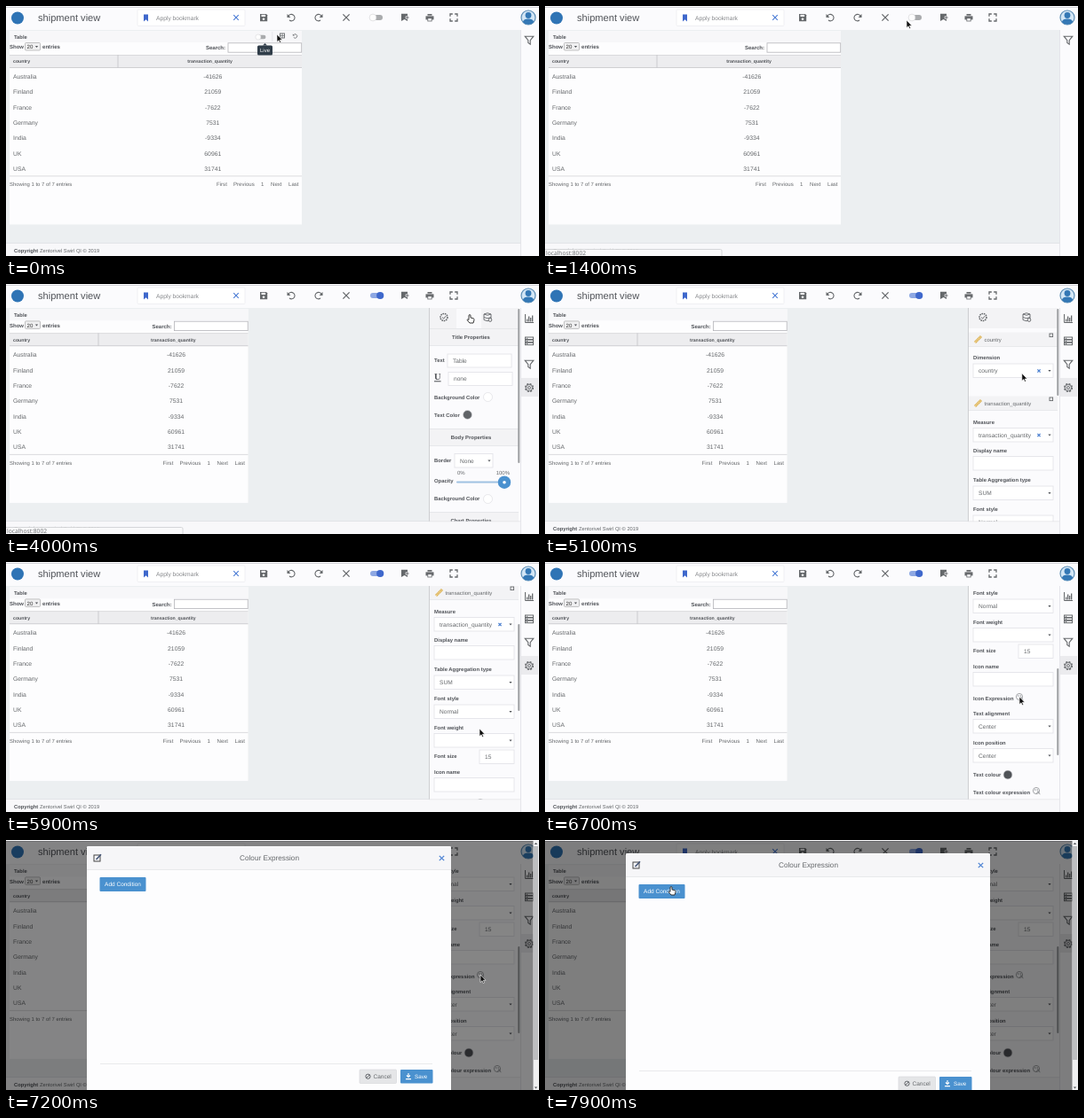
These frames come from a looping animation (600x282 px, 8 s). An HTML page:

```html
<!DOCTYPE html>
<html lang="en">
<head>
<meta charset="utf-8">
<title>Shipment view</title>
<style>
html, body { margin: 0; width: 100%; height: 100%; overflow: hidden; background: #eceff1; }
svg { display: block; width: 600px; height: 282px; font-family: "Liberation Sans", Arial, sans-serif; text-rendering: geometricPrecision; }
</style>
</head>
<body>
<svg id="stage" viewBox="0 0 600 282"></svg>
<script>
const LOOP = 8000, STEP = 100;
const GREY = '#65686b', INK = '#505358', BLUE = '#3f68cc', BUTTON = '#4a91cf', LINE = '#e1e2e6', PALE = '#fbfbfd', BAND = '#f3f3f5';

// Drawing helpers; text is placed by its vertical middle.
const rect = (x, y, w, h, fill, more = '') => `<rect x="${x}" y="${y}" width="${w}" height="${h}" fill="${fill}" ${more}/>`;
const circle = (x, y, r, fill, more = '') => `<circle cx="${x}" cy="${y}" r="${r}" fill="${fill}" ${more}/>`;
const stroke = (d, color = GREY, w = 1, more = '') => `<path d="${d}" fill="none" stroke="${color}" stroke-width="${w}" ${more}/>`;
const fill = (d, color = GREY, more = '') => `<path d="${d}" fill="${color}" ${more}/>`;
const text = (x, y, s, size = 6.1, color = GREY, more = '') =>
  `<text x="${x}" y="${y + size * .36}" font-size="${size}" fill="${color}" ${more}>${s}</text>`;
const bold = (x, y, s, size = 5.9, more = '') => text(x, y, s, size, INK, 'font-weight="bold" ' + more);
const MID = 'text-anchor="middle"', END = 'text-anchor="end"';
const at = (x, y, body, more = '', k = 1) => `<g transform="translate(${x} ${y}) scale(${k})" ${more}>${body}</g>`;
const caret = (x, y) => fill(`M${x - 1.6} ${y - .8}h3.2l-1.6 2z`, INK);
const cross = (x, y, r, color, w = 1.2) => stroke(`M${x - r} ${y - r}l${2 * r} ${2 * r}m0 ${-2 * r}l${-2 * r} ${2 * r}`, color, w);
const input = (x, y, w, h, value = '') => rect(x, y, w, h, '#fff', `stroke="${LINE}" stroke-width=".8"`) + text(x + 6, y + h / 2, value, 6.6);
const select = (x, y, w, h, value) => input(x, y, w, h, value) + caret(x + w - 4, y + h / 2);

const shapes = {
  save: fill('M-4-4H3L4.2-2.8V4.2H-4Z') + rect(-2.5, -3.2, 4.6, 2.2, PALE) + circle(0, 1.7, 1.3, PALE),
  undo: stroke('M-3-1.5A3.7 3.7 0 1 1-2 3', GREY, 1.1) + fill('M-4.5-4V0H-.6Z'),
  print: rect(-4.5, -1.6, 9, 4, GREY) + rect(-2.5, -4, 5, 1.7, GREY) + rect(-2.2, .8, 4.4, 3.2, PALE, `stroke="${GREY}" stroke-width=".8"`),
  expand: stroke('M-4-1.2V-4H-1.2M1.2-4H4V-1.2M4 1.2V4H1.2M-1.2 4H-4V1.2', GREY, 1.3),
  marker: fill('M-3.5-4.2H3.5V4L0 2-3.5 4Z') + stroke('M1.2 0h4M3.2-2v4', PALE, 2.3) + stroke('M1.5 0h3.6M3.3-1.8v3.6', GREY, .9),
  chart: stroke('M-4.5-5V4.5H5', GREY, 1) + [3, 6, 4.5, 7].map((h, i) => rect(-3 + i * 2, 3.5 - h, 1.3, h, GREY)).join(''),
  server: [-4.5, -1.4, 1.7].map(y => rect(-4.5, y, 9, 2.5, 'none', `stroke="${GREY}"`) + rect(-3.2, y + .8, 1.4, 1, GREY)).join(''),
  filter: stroke('M-4.8-4.3H4.8L1.2 .2V4.6L-1.2 3V.2Z', GREY, 1.1),
  grid: rect(-2.5, -2.5, 5, 5, 'none', `stroke="${GREY}" stroke-width=".9"`) + stroke('M-2.5 0h5M0-2.5v5', GREY, .7),
  reload: stroke('M-2-1A2.2 2.2 0 1 1-1.7 1.4', GREY, .8) + fill('M-2.7-2.6V-.4H-.6Z'),
  frame: rect(-2.2, -2.2, 4.4, 4.4, 'none', `stroke="${GREY}" stroke-width=".8" stroke-dasharray="2 1"`),
  badge: circle(0, 0, 4, 'none', `stroke="${GREY}" stroke-width="1.5" stroke-dasharray="1.6 .8"`) + stroke('M-2 0L-.3 1.6 2.2-1.4', GREY, 1),
  data: [-3.5, 0, 3].map(y => stroke(`M-4 ${y}q4 2.5 8 0`, GREY, .9)).join('') + stroke('M-4-3.5V3M4-3.5V3M-4-3.5q4-2.5 8 0', GREY, .9) + circle(3, 3, 1.8, PALE, `stroke="${GREY}" stroke-width="1"`),
  palette: circle(0, 0, 3.6, 'none', 'stroke="#8d9093" stroke-width=".8"') + circle(-1.2, -1, .7, '#8d9093') + circle(1.2, -1, .7, '#8d9093') + stroke('M.3 3.5L2 .5 4.2 4.2', '#8d9093', .8),
  arrow: fill('M0 0V8.6L2 6.8 3.3 9.6 4.6 9 3.3 6.3H6Z', '#111', 'stroke="#fff" stroke-width=".6"'),
  hand: fill('M-1 .2Q0-1 1 .2V3L4.2 3.8Q5.2 4.2 5 5.5L4 9H0L-3 5.6Q-2.5 4.4-1 5.3Z', '#fff', 'stroke="#222" stroke-width=".9"')
};
const icon = (name, x, y) => at(x, y, shapes[name]);
const gear = (x, y, color) => circle(x, y, 4.3, 'none', `stroke="${color}" stroke-width="1.5" stroke-dasharray="2.1 1.28"`) +
  circle(x, y, 3.5, 'none', `stroke="${color}" stroke-width=".8"`) + circle(x, y, 1.5, 'none', `stroke="${color}" stroke-width=".9"`);

function toggle(x, y, on, k = 1) {
  const knob = on ? circle(4.2, 0, 4.1, BLUE) : circle(-4, 0, 3.9, '#fdfdfd', 'stroke="#d2d2d4" stroke-width=".6"');
  return at(x, y, rect(-7, -3, 14, 6, on ? '#8ea8e3' : '#a9abad', 'rx="3"') + knob, '', k);
}

// Linear path through [time, ...values] keys.
function along(keys, t) {
  const i = keys.findIndex(k => k[0] > t);
  if (i < 0) return keys.at(-1).slice(1);
  if (!i) return keys[0].slice(1);
  const a = keys[i - 1], b = keys[i], f = (t - a[0]) / (b[0] - a[0]);
  return a.slice(1).map((v, j) => v + (b[j + 1] - v) * f);
}
const within = (t, a, b) => t >= a && t < b;

const pointerPath = [
  [0, 305, 32], [300, 311, 33], [900, 330, 20], [1400, 407, 16], [1600, 417, 13], [1900, 417, 13],
  [2600, 296, 37], [3600, 296, 37], [4000, 522, 35], [4200, 542, 35], [4700, 542, 35], [5400, 533, 150],
  [5900, 533, 188], [6200, 533, 188], [6700, 534, 152], [7200, 534, 152], [7900, 142, 53]
];
const scrollPath = [[5400, 0], [5900, 100], [6100, 219]];

function header(on) {
  return rect(0, 0, 600, 27, PALE) + rect(0, 1, 600, 1, '#d4d4d9') +
    circle(13, 13.5, 7, '#2f74b5') + text(36, 13, 'shipment view', 11.1, INK) +
    rect(148, 4, 121, 18.5, '#fff', 'rx="1" stroke="#ececf0" stroke-width=".8"') +
    fill('M155 9.5h5v8l-2.5-2.2-2.5 2.2z', BLUE) + text(169, 13.5, 'Apply bookmark', 6.7, '#85878a') + cross(259, 13, 2.8, '#4f7fd6') +
    icon('save', 290, 13) + icon('undo', 321, 13) + at(352, 13, `<g transform="scale(-1 1)">${shapes.undo}</g>`) +
    cross(383, 13, 3.6, GREY, 1.3) + toggle(417, 13, on) + icon('marker', 448.5, 13) + icon('print', 477, 13) + icon('expand', 504, 13) +
    circle(588, 13, 8, '#d3e6f5', 'stroke="#5c8db5" stroke-width="1.2"') +
    circle(588, 10.5, 3.4, '#3478b5') + fill('M581.8 18q1-3.4 6.2-3.4t6.2 3.4q-2.4 3-6.2 3t-6.2-3z', '#3478b5');
}

function sidebar(on, open) {
  const base = rect(579.5, 27, 20.5, 255, PALE) + rect(579, 27, .8, 255, LINE);
  if (!on) return base + icon('filter', 589, 38.5);
  return base + (open ? rect(580, 106, 19, 21, '#ebebee') : '') + icon('chart', 589, 39) + icon('server', 589, 64.5) +
    icon('filter', 589, 90.5) + gear(589, 117, open ? GREY : '#c6c8ca');
}

const rows = [['Australia', -41626], ['Finland', 21059], ['France', -7622], ['Germany', 7531], ['India', -9334], ['UK', 60961], ['USA', 31741]];

function tableCard(small) {
  const right = small ? 272.5 : 333, split = small ? 104 : 126, mid = (split + right) / 2;
  const body = rect(4, 28, right - 4, 218.5, '#fdfdfe') + rect(4, 28, right - 4, 13, '#f7f7f9') +
    bold(9, 34.8, 'Table', 5.8) + bold(4, 46, 'Show', 6) +
    rect(21.5, 41.5, 17, 8.5, '#f0f0f1', 'rx="1" stroke="#aaa" stroke-width=".7"') + text(23.5, 46, '20', 6.1, '#333') + caret(34.5, 45.8) + bold(41, 46, 'entries', 6.1) +
    bold(right - 86, 47, 'Search:', 6, END) + rect(right - 83, 41.8, 82.7, 10.4, '#fff', 'stroke="#b5b5b9" stroke-width=".8"') +
    rect(4, 55, right - 4, 14.5, '#ededef') + rect(4, 55, right - 4, .7, '#d3d3d6') + rect(4, 69, right - 4, .8, '#c6c6ca') + rect(split - .4, 55, .8, 14.5, '#c3c3c7') +
    bold(8, 62.3, 'country', 5.2) + bold(mid, 62.3, 'transaction_quantity', 5.15, MID) +
    rows.map(([name, n], i) => {
      const y = 79.5 + i * 17.35;
      return text(8, y, name, 6.8) + text(mid + 3.3, y, n, 6.8, GREY, MID);
    }).join('') +
    rect(4, 191.5, right - 4, .8, '#d3d3d7') + text(4, 201, 'Showing 1 to 7 of 7 entries', 5.95) +
    [['First', -96], ['Previous', -77], ['1', -46], ['Next', -35], ['Last', -15]].map(([s, x]) => text(right + x, 201, s)).join('');
  return at(0, small ? .4 : 0, body);
}

function cardTools(on) {
  const x = on ? -15.5 : 0;
  return toggle(287 + x, 35, false, .78) + rect(299.5 + x, 29, .7, 11, LINE) +
    (on ? icon('grid', 296, 33.5) + icon('frame', 311, 34) + icon('reload', 325.5, 34) + stroke('M326 240l4.5 4.5M325.8 242v-2.2h2.2M330.8 242.5v2.2h-2.2', '#222', 1)
        : icon('grid', 311, 33.5) + icon('reload', 325.5, 34));
}

const bandHead = (y, s) => rect(476, y, 101, 19.5, BAND) + rect(476, y, 101, .7, LINE) + rect(476, y + 19, 101, .7, LINE) + bold(523.5, y + 10, s, 5.9, MID);
const swatch = (x, y, color) => circle(x, y, 5, color, 'stroke="#dedee2" stroke-width=".7"');
const tabs = rect(476, 27, 101, 23, BAND) + icon('badge', 493, 37.5) + icon('data', 542, 37.5);

function lookPanel() {
  return tabs + rect(507, 28, 28, 22, '#fafafc') +
    bandHead(50, 'Title Properties') + bold(482, 86, 'Text') + input(497, 79, 72, 15, 'Table') +
    text(482, 104.5, 'U', 10.5, INK, 'font-family="Liberation Serif, serif" font-weight="bold" text-decoration="underline"') + input(498, 99.5, 72, 15, 'none') +
    bold(482, 127.5, 'Background Color') + swatch(542.5, 127.5, '#fff') + bold(482, 147.5, 'Text Color') + swatch(519.5, 147.5, '#606367') +
    bandHead(163, 'Body Properties') + bold(482, 198.5, 'Border') + select(505, 191.5, 43, 15.5, 'None') +
    text(508, 212.5, '0%', 6) + text(567, 212.5, '100%', 6, GREY, END) + bold(482, 221.5, 'Opacity') +
    rect(507, 222.5, 54, 2, '#9fc1e2', 'rx="1"') + circle(561, 223.7, 7.2, BUTTON) + circle(561, 223.7, 1.8, '#fff') +
    bold(482, 242, 'Background Color') + swatch(542.5, 242.5, '#fff') + bandHead(257, 'Chart Properties');
}

const fieldHead = (y, s) => rect(476, y - 7.5, 101, 15.5, BAND) + rect(476, y + 8, 101, .7, LINE) +
  stroke(`M484 ${y + 4}l7-7`, '#dcb45c', 3) + stroke(`M484 ${y + 4}l7-7`, '#f6dfa5', 1.4, 'stroke-dasharray="1 1"') + text(494.5, y + .5, s, 5.9) +
  rect(568, y - 6, 3.6, 3.6, 'none', `stroke="${GREY}" stroke-width=".9"`);
const picker = (y, label, value) => bold(482, y, label) + select(482, y + 7, 90, 15.5, value);
const columnPick = (y, label, value) => picker(y, label, value) + cross(556, y + 15, 1.6, '#4b7fd0', 1.3);
const entry = (y, label) => bold(482, y, label) + input(482, y + 6.5, 90, 15.5);

function dataPanel() {
  return tabs + fieldHead(62, 'country') + columnPick(83, 'Dimension', 'country') +
    fieldHead(134, 'transaction_quantity') + columnPick(155.5, 'Measure', 'transaction_quantity') + entry(188, 'Display name') +
    picker(221, 'Table Aggregation type', 'SUM') + picker(254, 'Font style', 'Normal') + picker(286.5, 'Font weight', '') +
    bold(482, 319, 'Font size') + input(533, 312, 39, 15.5, '15') + entry(337, 'Icon name') +
    bold(482, 373, 'Icon Expression') + icon('palette', 534, 371) +
    picker(389.5, 'Text alignment', 'Center') + picker(422.5, 'Icon position', 'Center') +
    bold(482, 459, 'Text colour') + swatch(521, 459, INK) + bold(482, 478.5, 'Text colour expression') + icon('palette', 553, 477);
}

function panel(t) {
  const data = t >= 4300, scroll = along(scrollPath, t)[0];
  return `<g clip-path="url(#pane)">` + rect(476, 27, 103, 241, PALE) + at(0, -scroll, data ? dataPanel() : lookPanel()) +
    rect(576.3, data ? 28 + scroll * .42 : 28, 2, data ? 98 : 174, '#9b9da0', 'rx="1"') + rect(476, 27, .9, 241, '#c9cacd') + '</g>' +
    rect(476, 267.5, 103, .7, LINE);
}

// Label bubble with its pointer above, or below when "down".
function tip(x, y, w, label, size, down, inset = 0) {
  const edge = down ? y + 5.4 : y - 5.4, dir = down ? 2.5 : -2.5;
  return rect(x - w / 2, y - 5.5, w, 11, '#303d49', 'rx="1.5"') + fill(`M${x - 2.5} ${edge}h5l-2.5 ${dir}z`, '#303d49') + text(x + inset, y, label, size, '#fff', MID);
}

function dialog(t) {
  const [y, alpha, shade] = along([[7100, -35.3, .7, .33], [7200, -8, 1, .48], [7300, 0, 1, .5]], t);
  const body = rect(91, 15, 410, 289, '#fdfdfe', 'rx="1.5"') + rect(91, 15.5, 410, 26, '#f6f6f8') + rect(91, 41, 410, .7, LINE) +
    rect(99, 25, 7, 7, 'none', 'stroke="#444" stroke-width="1"') + stroke('M101.5 30l5.5-5.8', '#445577', 1.6) +
    text(296.5, 28, 'Colour Expression', 8.2, GREY, MID) + cross(490.5, 28.5, 2.7, '#477fd2') +
    rect(105.5, 50, 52, 16, BUTTON, 'rx="1"') + text(131.5, 58, 'Add Condition', 6.5, '#fff', MID) + rect(106, 260, 374, .7, LINE) +
    rect(398, 267, 41.5, 15.5, '#e5e6e8', 'rx="1" stroke="#d4d5d8" stroke-width=".6"') +
    circle(407.5, 274.7, 2.6, 'none', `stroke="${INK}" stroke-width=".9"`) + stroke('M405.8 276.5l3.5-3.6', INK, .9) + text(413.5, 274.8, 'Cancel', 6.5) +
    rect(444, 267, 36.5, 15.5, BUTTON, 'rx="1"') + stroke('M453 271v4M451 273.5l2 2 2-2M450 277.6h6', '#fff', 1.1) + text(460, 274.8, 'Save', 6.3, '#fff');
  return rect(0, 1, 600, 281, '#000', `opacity="${shade}"`) +
    rect(593.5, 1, 6.5, 281, '#f0f0f1') + rect(594, 7, 5, 241, '#bdbec0') + fill('M594.8 5h3.4l-1.7-2z', INK) + fill('M594.8 278.5h3.4l-1.7 2z', INK) +
    at(0, y, body, `opacity="${alpha}"`);
}

function scene(t) {
  const on = t >= 1700, open = t >= 3700;
  const [px, py] = along(pointerPath, t);
  const hand = within(t, 2400, 3700) || within(t, 3900, 4700) || t >= 7800;
  const tipAlpha = along([[7000, 1], [7100, .45], [7200, 0]], t)[0];
  return '<defs><clipPath id="pane"><rect x="476" y="27" width="103" height="241"/></clipPath></defs>' +
    rect(0, 0, 600, 282, '#eceff1') + header(on) + tableCard(open) +
    (t < 700 || within(t, 2400, 3600) ? cardTools(on) : '') +
    rect(0, 267.5, 580, 14.5, '#f8f8fa') + rect(0, 267, 580, .8, '#dfe1e4') +
    bold(9, 275.7, 'Copyright', 5.75) + text(38, 275.7, 'Zentorivel Swirl QI © 2019', 5.75) +
    sidebar(on, open) + (open ? panel(t) : '') +
    (t < 300 ? tip(291.5, 50, 17, 'Live', 6) : '') +
    (within(t, 6800, 7200) ? at(0, 0, tip(527, 137.5, 76, 'Conditional Expressions', 5.4, true, 4.5), `opacity="${tipAlpha}"`) : '') +
    (within(t, 400, 1700) || within(t, 3000, 4500)
      ? fill('M-1 274.5H197.5q1.5 0 1.5 1.5V283H-1Z', '#f9f9fa', 'stroke="#cdced1" stroke-width=".8"') +
        text(1, 279, 'localhost:8002', 6.7, GREY, 'font-family="Open Sans, sans-serif"') : '') +
    (t >= 7100 ? dialog(t) : '') +
    icon(hand ? 'hand' : 'arrow', px, py);
}

const stage = document.getElementById('stage');
let shown = -1;
function tick() {
  const t = Math.floor(performance.now() % LOOP / STEP) * STEP;
  if (t !== shown) stage.innerHTML = scene(shown = t);
  requestAnimationFrame(tick);
}
tick();
</script>
</body>
</html>
```
